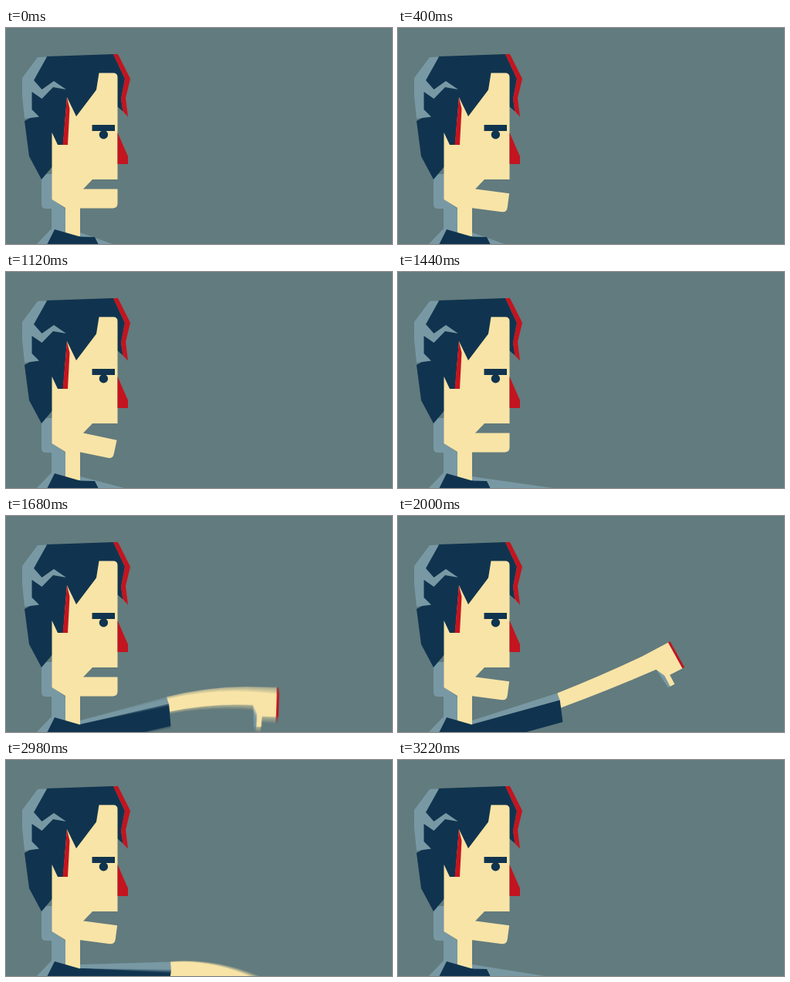
Write an HTML page with a canvas that moves like this. It is 500x281 px and loops after 3.3 s.

```html
<!DOCTYPE html>
<html lang="en">
<head>
<meta charset="utf-8">
<title>Thumbs down</title>
<style>
html, body { margin: 0; width: 100%; height: 100%; overflow: hidden; background: #627b7e; }
canvas { display: block; width: 100%; height: 100%; }
</style>
</head>
<body>
<canvas id="stage" width="500" height="281"></canvas>
<script>
const W = 500, H = 281, LOOP = 3300, STEP = 80, RAD = Math.PI / 180;
const BG = '#627b7e', SKIN = '#f8e4a6', DARK = '#10344f', LIGHT = '#7899a4', RED = '#c3141f';

const view = document.getElementById('stage').getContext('2d');
const layer = document.createElement('canvas');
layer.width = W;
layer.height = H;
const ctx = layer.getContext('2d');

const easeIn = u => u * u;
const easeOut = u => 1 - easeIn(1 - u);
const easeBoth = u => (1 - Math.cos(Math.PI * u)) / 2;
const mix = (a, b, u) => a + (b - a) * u;

// Arm poses: sleeve angle, forearm angle, forearm length
const REST = [88, 110, 158], LOW = [68, 95, 158], DROP = [45, 70, 158];
const REACH = [-13, -4.5, 144], UP = [-15.5, -24.7, 159], DOWN = [-16.6, -6.3, 158];

// Each move: end time, pose reached, easing
const MOVES = [
  [0, REST], [960, REST, easeBoth], [1120, LOW, easeBoth], [1680, REACH, easeIn],
  [2000, UP, easeOut], [2400, DOWN, easeBoth], [2840, DOWN, easeBoth],
  [3220, DROP, easeBoth], [LOOP, REST, easeBoth]
];

function armPose(t) {
  t = Math.max(0, Math.min(LOOP, t));
  const i = Math.max(1, MOVES.findIndex(m => m[0] >= t));
  const [t0, from] = MOVES[i - 1], [t1, to, ease] = MOVES[i];
  const u = ease((t - t0) / (t1 - t0));
  return from.map((v, k) => mix(v, to[k], u));
}

// Chatter that opens wider in the middle of the sentence
function jawAngle(t) {
  const stress = Math.max(0, Math.sin(Math.PI * t / 2400));
  return (8 + 8 * stress ** 2) * Math.sin(Math.PI * t / 240) ** 2;
}

function poly(color, ...p) {
  ctx.fillStyle = color;
  ctx.beginPath();
  for (let i = 0; i < p.length; i += 2) ctx.lineTo(p[i], p[i + 1]);
  ctx.fill();
}

function shape(color, path) {
  ctx.fillStyle = color;
  ctx.fill(new Path2D(path));
}

function placed(x, y, deg, draw) {
  ctx.save();
  ctx.translate(x, y);
  ctx.rotate(deg * RAD);
  draw();
  ctx.restore();
}

// A point given in a frame at (ox, oy) turned by deg
function turned(ox, oy, deg, x, y) {
  const c = Math.cos(deg * RAD), s = Math.sin(deg * RAD);
  return [ox + x * c - y * s, oy + x * s + y * c];
}

function drawHead(jaw) {
  // neck
  shape(LIGHT, 'M46 190H60V223L77 235V275H59V235H52Q46 235 46 229Z');
  poly(SKIN, 77, 209, 100, 209, 101, 234, 96, 234, 96, 275, 77, 275);
  // hair mass, then its pale strand
  poly(DARK, 53, 37, 139, 34, 154, 66, 149, 92, 151.5, 108.5, 144, 102,
    100, 140, 59.5, 181, 46, 197, 30, 167, 24, 121, 31, 117, 24, 80);
  poly(LIGHT, 21, 65, 41, 38, 53, 37.5, 36, 68, 46.5, 80, 62, 69, 78, 80,
    61, 77, 46.5, 92, 33.5, 83, 33.5, 106, 43, 115.5, 24, 118, 21, 88);
  // face cut to the hairline, with the mouth notch left open
  shape(SKIN, 'M59.5 136L67 152H74L79 90L91 115L117 80.5L120.500 58.500H139Q144.500 58.500 144.500 64' +
    'V197H112L100 209.500V234H77L59.500 223Z');
  placed(100, 209.5, jaw, () => shape(SKIN, 'M-1 0H44.500V18.500Q44.500 25 38 25H-4Z'));
  // red shadows
  poly(RED, 79, 90, 82.5, 105, 80, 152, 73.5, 152);
  poly(RED, 139, 34, 145, 34, 161, 66, 155, 91, 158, 115.5, 151.5, 108.5, 149, 92, 154, 66);
  poly(RED, 144.5, 136, 158, 167, 158, 177, 144.5, 177);
  // brow and eye
  ctx.fillStyle = DARK;
  ctx.fillRect(111.5, 126, 29.5, 8);
  ctx.beginPath();
  ctx.arc(126.4, 138.7, 5.7, 0, 7);
  ctx.fill();
}

function drawHand() {
  poly(LIGHT, -31, 22, -24, 22, -24, 52, -28, 52);
  poly(SKIN, -41, 0.5, 0, 0, 0, 38.5, -18.5, 38.5, -18.5, 52, -25, 52, -25, 36, -31, 24);
  poly(RED, -1, 0, 2, 0, 3, 38.5, 0, 38.5);
}

function drawArm([lift, swing, reach]) {
  const sx = 96, sy = 271;
  // the pale upper side lags behind when the arm hangs
  const edge = Math.min(lift, lift / 4);
  const [lx, ly] = turned(sx, sy, lift < 0 ? lift : edge, 117, -9.5);
  const [tx, ty] = turned(sx, sy, lift, 118, 0);
  const [ux, uy] = turned(sx, sy, lift, 116.5, 10);
  const [hx, hy] = turned(lx, ly, swing, reach, 0);
  const wrist = 1.5 * (swing + 6.3), bend = -6 - 0.44 * (swing + 6.3);
  const [ax, ay] = turned(hx, hy, wrist, -40, 0.5);
  const [bx, by] = turned(hx, hy, wrist, -31, 24);
  const [px, py] = turned(hx, hy, wrist, -18, 24);

  placed(hx, hy, wrist, drawHand);

  // forearm
  ctx.fillStyle = SKIN;
  ctx.beginPath();
  ctx.moveTo(lx, ly);
  ctx.quadraticCurveTo((lx + ax) / 2, (ly + ay) / 2 + bend, ax, ay);
  ctx.lineTo(px, py);
  ctx.lineTo(bx, by);
  ctx.quadraticCurveTo((ux + bx) / 2, (uy + by) / 2 + bend, ux, uy);
  ctx.fill();

  // sleeve
  poly(LIGHT, sx, sy - 5, lx, ly, tx, ty, sx, sy + 1);
  placed(sx, sy, lift, () => poly(DARK, 0, 0, 118, 0, 114, 28.5, 0, 28.5));
}

function drawScene(jaw, arm) {
  ctx.fillStyle = BG;
  ctx.fillRect(0, 0, W, H);
  drawHead(jaw);
  drawArm(arm);
  // collar
  poly(LIGHT, 59, 261, 64, 261, 56, 282, 39, 282);
  poly(DARK, 63, 262, 96, 271.5, 115, 272, 120, 282, 53, 282);
}

// A running average of several arm poses gives the motion blur
function render(t) {
  const count = 7, shutter = 10;
  for (let i = 0; i < count; i++) {
    drawScene(jawAngle(t), armPose(t + (i / (count - 1) - 0.5) * shutter));
    view.globalAlpha = 1 / (i + 1);
    view.drawImage(layer, 0, 0);
  }
}

// 80 ms steps with a hold from 2400 to 2900
function snap(t) {
  if (t < 2900) return Math.min(2400, Math.floor(t / STEP) * STEP);
  return 2900 + Math.floor((t - 2900) / STEP) * STEP;
}

const start = performance.now();
let shown = -1;
function tick() {
  const t = snap((performance.now() - start) % LOOP);
  if (t !== shown) render(shown = t);
  requestAnimationFrame(tick);
}
tick();
</script>
</body>
</html>
```
